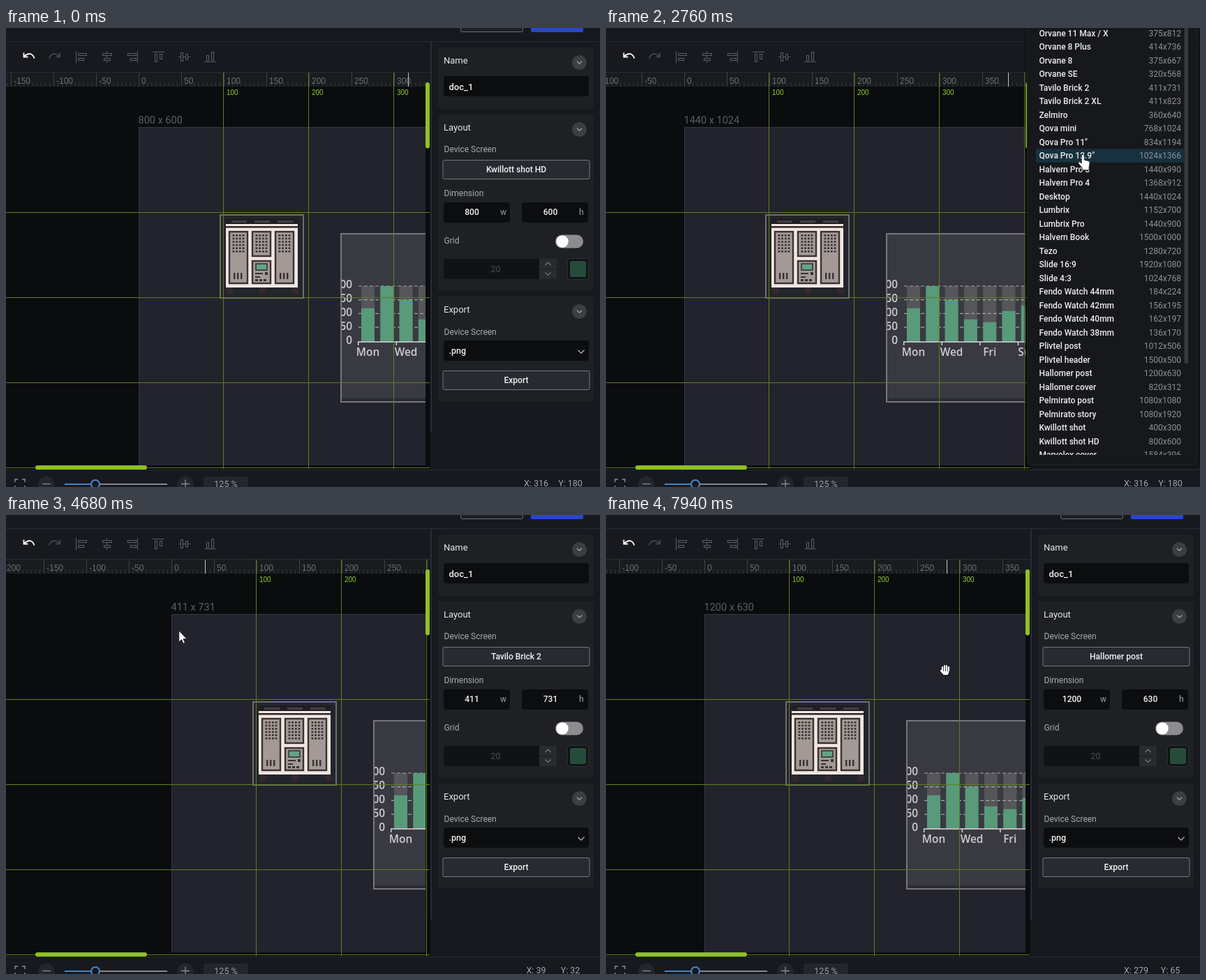
These frames come from a looping animation (851 by 658 pixels, 8000 ms). An HTML page:

```html
<!DOCTYPE html>
<html lang="en">
<head>
<meta charset="utf-8">
<title>Layout editor</title>
<style>
html, body { margin: 0; width: 100%; height: 100%; overflow: hidden; background: #17191f; }
svg { display: block; width: 851px; height: 658px; }
text { font-family: Roboto, "Liberation Sans", sans-serif; white-space: pre; }
.chart text { font: 600 15.4px "Open Sans", "Noto Sans", sans-serif; }
.ruler text { font-family: "Liberation Sans", Arial, sans-serif; }
</style>
</head>
<body>
<svg id="stage" viewBox="0 0 851 658" xmlns="http://www.w3.org/2000/svg"></svg>
<script>
const LOOP = 8000, UNIT = 1.22, FADE = 200, ROW = 19.5;
const MID = 'text-anchor="middle"', END = 'text-anchor="end"', MED = 'font-weight="500"';
const GUIDE = '#5c7f1f', LIME = '#8fc022', INPUT = '#0b0d0f';

// time, page left edge, width, height, preset name
const pages = [
  [0, 190, 800, 600, 'Kwillott shot HD'],
  [1690, 112, 1440, 1024, 'Desktop'],
  [3650, 237, 411, 731, 'Tavilo Brick 2'],
  [6230, 141, 1200, 630, 'Hallomer post']
];
const menuTimes = [[420, 1690], [2560, 3650], [5560, 6230]];
const clicks = [340, 1600, 2490, 3490, 5490, 6110];
// time, x, y
const path = [
  [70, 645, 300], [320, 705, 206], [520, 705, 206], [850, 700, 120], [1150, 691, 228.5],
  [1450, 688, 243], [1750, 687, 244], [2150, 687, 244], [2400, 690, 205], [2600, 690, 205],
  [3310, 658, 102], [3380, 656, 92], [3450, 655, 82], [3700, 655, 82], [4150, 590, 225],
  [4610, 286, 182], [4680, 248, 166], [4830, 219, 160], [5000, 265, 190], [5100, 380, 215],
  [5400, 695, 205], [5600, 695, 205], [6000, 652, 495], [6230, 652, 495], [6330, 462, 365],
  [6400, 377, 314], [6700, 215, 150], [7000, 118, 128], [7250, 190, 170], [7500, 455, 214],
  [7870, 488, 222], [8000, 488, 222]
];
const GRAB = 7300;

const presets = `Orvane 11 Max / X|375x812
Orvane 8 Plus|414x736
Orvane 8|375x667
Orvane SE|320x568
Tavilo Brick 2|411x731
Tavilo Brick 2 XL|411x823
Zelmiro|360x640
Qova mini|768x1024
Qova Pro 11"|834x1194
Qova Pro 12.9"|1024x1366
Halvern Pro 3|1440x990
Halvern Pro 4|1368x912
Desktop|1440x1024
Lumbrix|1152x700
Lumbrix Pro|1440x900
Halvern Book|1500x1000
Tezo|1280x720
Slide 16:9|1920x1080
Slide 4:3|1024x768
Fendo Watch 44mm|184x224
Fendo Watch 42mm|156x195
Fendo Watch 40mm|162x197
Fendo Watch 38mm|136x170
Plivtel post|1012x506
Plivtel header|1500x500
Hallomer post|1200x630
Hallomer cover|820x312
Pelmirato post|1080x1080
Pelmirato story|1080x1920
Kwillott shot|400x300
Kwillott shot HD|800x600
Marvolex cover|1584x396`.split('\n').map(s => s.split('|'));

const rect = (x, y, w, h, fill, more = '') =>
  `<rect x="${x}" y="${y}" width="${w}" height="${h}" fill="${fill}" ${more}/>`;
const stroke = (d, color, width = 1, more = '') =>
  `<path d="${d}" fill="none" stroke="${color}" stroke-width="${width}" ${more}/>`;
const circle = (x, y, r, fill, more = '') => `<circle cx="${x}" cy="${y}" r="${r}" fill="${fill}" ${more}/>`;
const text = (x, y, s, size, fill, more = '') =>
  `<text x="${x}" y="${y}" font-size="${size}" fill="${fill}" ${more}>${s}</text>`;
const group = (inner, more = '') => `<g ${more}>${inner}</g>`;
const clip = (id, x, y, w, h) => `<clipPath id="${id}">${rect(x, y, w, h, '#000')}</clipPath>`;
const each = (n, fn) => Array.from({ length: n }, (_, i) => fn(i)).join('');
const chevron = (x, y, s, color, up = 1) =>
  stroke(`M${x - s} ${y - s / 2 * up}L${x} ${y + s / 2 * up}L${x + s} ${y - s / 2 * up}`, color, 1.2);

function machine() {
  const dark = '#3a3231', pink = '#f2e6e2';
  const door = (x, y, h) => rect(x, y, 26, h, '#a39a97', `stroke="${dark}" stroke-width="2.4"`);
  const dots = x => each(24, i => rect(x + i % 4 * 4.7, 296 + (i >> 2) * 4.6, 2.8, 2.6, dark));
  const slits = x => each(3, i => rect(x + i * 5, 351, 2.4, 9, dark));
  return rect(117, 268, 119, 119, '#24242c', 'stroke="#6c6e72" stroke-width="2"') +
    each(3, i => rect(126 + i * 47, 372, 9, 9, '#33292c')) +
    rect(125, 273, 103, 8, '#1f1e22') + each(3, i => rect(133 + i * 33, 276, 22, 3, '#464143')) +
    rect(125, 281, 103, 91, pink) + rect(125, 284, 103, 2.5, '#2c2627') +
    door(130, 292, 74) + dots(134.5) + slits(136) +
    door(163, 292, 35) + dots(167.5) +
    door(196, 292, 74) + dots(200.5) + slits(202) +
    door(163, 334, 32) + rect(168, 338, 16, 9, '#64a387', `stroke="${dark}" stroke-width="1.6"`) +
    rect(167, 351, 11, 2, dark) + rect(167, 356, 7, 2, dark) + rect(181, 350, 4, 4, dark) +
    each(3, i => rect(167 + i * 6, 360, 4, 3, dark));
}

function chart() {
  const values = [120, 200, 150, 80, 70, 110, 130];
  const bar = (v, i, fill) => rect(319 + i * 27.3, 449.5 - v * .3975, 19, v * .3975, fill);
  const labels = ['Mon', 'Wed', 'Fri', 'Sun'];
  return rect(290, 295, 300, 241, '#393941') + rect(290, 531, 300, 4, '#2a2a32') +
    values.map((v, i) => bar(200, i, '#55555a')).join('') +
    each(4, i => stroke(`M315 ${370 + i * 19.7}H520`, '#a3a3a6', 1.2, 'stroke-dasharray="5 3"')) +
    values.map((v, i) => bar(v, i, '#589a7a')).join('') +
    stroke('M314 450H520', '#dcdcde', 1.4) +
    labels.map((s, i) => stroke(`M${314.7 + i * 54.6} 450v5`, '#dcdcde', 1.4) +
      text(328.5 + i * 54.6, 470, s, 15, '#cdcdcf', MID)).join('') +
    group(each(5, i => text(306, 453 - i * 20.1, i * 50, 15, '#cdcdcf', END)), 'clip-path="url(#plot)"') +
    rect(290, 295, 300, 241, 'none', 'stroke="#76787b" stroke-width="2"');
}

function ruler() {
  return each(170, i => stroke(`M${(i - 80) * 6.1 + .5} 78v6`, '#36383d')) +
    each(17, i => {
      const x = (i - 8) * 61;
      return stroke(`M${x + .5} 64v20`, '#3f4146') + text(x + 4, 80, (i - 8) * 50, 12, '#6b6d72');
    });
}

function toolbar() {
  const g = '#5c5f65';
  const box = (x, y, w, h) => rect(x + .5, y + .5, w, h, 'none', `stroke="${g}"`);
  const flip = (inner, x) => group(inner, `transform="translate(${x} 0)"`);
  const turn = (color, width) =>
    stroke('M25.5 35.5V41.5H31.5M26.5 40.5Q31 36.2 35 37.2Q39 38.4 40.5 43.5', color, width);
  return turn('#f2f2f2', 1.9) +
    group(turn('#4b4d53', 1.6), 'transform="translate(102.5 0) scale(-1 1)"') +
    flip(stroke('M.5 33v17', g) + box(3, 36, 12, 3) + box(3, 43, 8, 3), 100) +
    flip(stroke('M7.5 33v3M7.5 40v3M7.5 47v3', g) + box(1, 36, 13, 3) + box(3, 43, 9, 3), 137) +
    flip(stroke('M14.5 33v17', g) + box(0, 36, 12, 3) + box(4, 43, 8, 3), 174) +
    flip(stroke('M0 34.5h17', g) + box(3, 37, 3, 11) + box(10, 37, 3, 7), 210) +
    flip(stroke('M0 41.5h3M7 41.5h3M14 41.5h3', g) + box(3, 35, 3, 12) + box(10, 37, 3, 8), 247) +
    flip(stroke('M0 48.5h17', g) + box(3, 39, 3, 7) + box(10, 34, 3, 12), 284);
}

function panel() {
  const card = (y, h, title) => rect(619, y, 223, h, '#1e2024', 'rx="4"') +
    text(627, y + 23, title, 13, '#e6e7e9') + circle(821.5, y + 21.5, 10.5, '#3c3e44') +
    chevron(821.5, y + 21.5, 3.5, '#a6a8ac');
  const field = (x, y, w) => rect(x, y, w, 29, INPUT, 'rx="4"');
  const button = y => rect(626, y + .5, 210, 27, '#272a30', 'rx="2" stroke="#74777c"');
  const note = (y, s) => text(627.5, y, s, 12, '#a9abaf');
  return rect(608, 20, 243, 613, '#17191f') + stroke('M609 20V580', '#262c3a', 2) +
    card(28, 88, 'Name') + field(627, 69, 208) + text(634.5, 89, 'doc_1', 13, '#f0f0f1', MED) +
    card(124, 253, 'Layout') + note(178, 'Device Screen') + button(189) +
    text(731, 206.5, '', 12, '#f2f2f3', `${MID} ${MED} id="preset"`) +
    note(241, 'Dimension') + field(627, 250, 95) + field(739, 250, 95) +
    text(667.5, 268, '', 12, '#f2f2f3', `${MID} ${MED} id="w"`) + text(708, 268, 'w', 12, '#9fa1a5') +
    text(780, 268, '', 12, '#f2f2f3', `${MID} ${MED} id="h"`) + text(821, 268, 'h', 12, '#9fa1a5') +
    note(309, 'Grid') + rect(787, 296.5, 40, 19, '#8d8d8f', 'rx="9.5"') + circle(797, 306, 8.7, '#fff') +
    rect(627, 331, 138, 29, '#101215', 'rx="4"') + text(701.5, 350, '20', 12.5, '#4b4d52', MID) +
    rect(764, 331, 25, 14, '#292b2f') + rect(764, 346, 25, 14, '#292b2f') +
    chevron(776.5, 338, 4, '#76787c', -1) + chevron(776.5, 352.5, 4, '#76787c') +
    rect(804.5, 330.5, 30, 30, '#111316', 'rx="4" stroke="#2d3035"') + rect(808, 334, 23, 23, '#264b3a', 'rx="3"') +
    card(385, 150, 'Export') + note(440, 'Device Screen') + field(627, 448, 208) +
    text(634.5, 467, '.png', 12.5, '#f0f0f1', MED) + chevron(824, 464, 4.5, '#b9bbbe') +
    button(491) + text(731, 508.5, 'Export', 12, '#f2f2f3', `${MID} ${MED}`);
}

function footer() {
  const g = '#8b8d92';
  return rect(0, 633, 851, 25, '#17191f') + rect(0, 633, 851, 1, '#2b2e35') +
    stroke('M13 651v-4h4M23 647h4v4M13 656v4M27 656v4', g, 1.4) +
    circle(58, 654, 11.5, '#23262c') + stroke('M52 653.5h12', g, 1.3) +
    rect(84, 653, 147, 2, '#85878b') + rect(84, 653, 44, 2, '#4682c4') +
    circle(128, 654, 6, '#17191f', 'stroke="#4c8ad0" stroke-width="2"') +
    circle(257, 654, 11.5, '#23262c') + stroke('M251 653.5h12M257 647.5v12', g, 1.3) +
    rect(283, 643, 64, 22, '#23262c', 'rx="3"') + text(315, 658, '125 %', 12.5, '#9b9da2', MID) +
    text(759.5, 657, '', 12.5, '#a3a5a9', `${MID} id="px"`) + text(808.5, 657, '', 12.5, '#a3a5a9', `${MID} id="py"`);
}

function menu() {
  const rows = presets.map(([name, size], i) => {
    const y = 11.5 + i * ROW;
    return text(620.5, y, name, 12, '#ececee', MED) + text(824, y, size, 12, '#8f9196', END);
  }).join('');
  return rect(599, -20, 252, 650, '#000', 'rx="6" opacity=".22"') +
    rect(603.5, -20, 243, 646.5, '#16181c', 'rx="5" stroke="#202226"') +
    group(rect(616, 0, 212, ROW, '#17313e', 'id="hover"') + rows, 'clip-path="url(#list)"') +
    rect(828.5, -10, 5.5, 491, '#37393c', 'rx="2.7"');
}

function pointers() {
  const edge = 'fill="#fff" stroke="#16171a" stroke-width=".8" stroke-linejoin="round"';
  const fingers = 'M-4 2V-4M-1 1V-6M2 1V-6M5 1V-4M-4 4L-6 1';
  const palm = 'M-5 1H6V4L4 8H-3L-5 4Z';
  return circle(0, 0, 11.5, '#c9bd16', 'opacity=".78" id="ring"') +
    `<path id="arrow" d="M0 0V16L3.7 12.6L6.2 18.3L8.6 17.2L6.2 11.7H11.2Z" ${edge}/>` +
    `<path id="finger" d="M-1.5 1.5a2 2 0 0 1 4 0V7.5l5.5 1.3q2.5 .6 2.3 3l-1 6v4.2H-.5v-3l-5-6q-1.2-2.3 .7-3l3.3 2.2Z" ${edge}/>` +
    group(stroke(fingers, '#16171a', 3.8, 'stroke-linecap="round"') +
      `<path d="${palm}" fill="#fff" stroke="#16171a" stroke-width="1.4"/>` +
      stroke(fingers, '#fff', 2.2, 'stroke-linecap="round"'), 'id="grab" transform="translate(-2 0)"');
}

document.getElementById('stage').innerHTML =
  `<defs>${clip('view', 0, 84, 601, 543)}${clip('scale', 0, 64, 607, 20)}${clip('guides', 0, 64, 607, 568)}
  ${clip('list', 603, 0, 240, 612)}${clip('plot', 291, 296, 200, 200)}</defs>` +
  rect(0, 0, 851, 658, '#17191f') + rect(0, 19, 851, 1, '#2a2c32') +
  rect(651.5, -20, 89, 25.5, '#1c1f24', 'rx="2" stroke="#6d7074"') + rect(752, -20, 75, 26, '#2b46c8', 'rx="2"') +
  toolbar() + rect(0, 63, 608, 571, '#0a0c0e') + rect(0, 63, 608, 21, '#191b1f') + rect(0, 63, 608, 1, '#2a2c31') +
  group(group(rect(.5, 142.5, 1800, 700, '#23232d', 'stroke="#37373f"') +
    text(-.5, 136.5, '', 14.5, '#5c5e65', 'id="size"') + machine() + group(chart(), 'class="chart"'),
    'class="page"'), 'clip-path="url(#view)"') +
  group(group(ruler(), 'class="page ruler"') + rect(0, 64, 1, 20, '#c4c5c7', 'id="mark"'), 'clip-path="url(#scale)"') +
  each(4, i => stroke(`M0 ${264.5 + i * 122}H607`, GUIDE)) +
  group(group(each(4, i => stroke(`M${121.5 + i * 122} 64V632`, GUIDE)), 'class="page"'), 'clip-path="url(#guides)"') +
  group(group(each(4, i => text(126 + i * 122, 95.5, (i + 1) * 100, 10, '#93cc2a')), 'class="page ruler"'), 'clip-path="url(#view)"') +
  rect(601, 78, 6, 94.5, LIME, 'rx="3" clip-path="url(#guides)"') + rect(42, 627, 160, 6, LIME, 'rx="3"') +
  panel() + footer() + group(menu(), 'id="menu"') + group(pointers(), 'id="cursor"');

const el = {};
document.querySelectorAll('svg [id]').forEach(n => el[n.id] = n);
const movers = document.querySelectorAll('.page');
const show = (node, on) => node.setAttribute('visibility', on ? 'visible' : 'hidden');
const clamp = v => Math.max(0, Math.min(1, v));

function at(t) {
  const i = path.findIndex(k => k[0] > t);
  if (i <= 0) return path[i < 0 ? path.length - 1 : 0].slice(1);
  const a = path[i - 1], b = path[i], f = (t - a[0]) / (b[0] - a[0]);
  return [a[1] + (b[1] - a[1]) * f, a[2] + (b[2] - a[2]) * f];
}

// The ruler mark trails the pointer and holds while it is outside the canvas.
function probe(t, left, grab) {
  const [x, y] = at(t - 70);
  if (x < 600) return [x, Math.round((x - left - 1 - (grab ? 6 : 0)) / UNIT), Math.round((y - 143) / UNIT)];
  return t < 5000 ? [576, 316, 180] : [595, 293, 52];
}

function draw(t) {
  const [, left, w, h, name] = pages.filter(p => p[0] <= t).pop();
  movers.forEach(n => n.setAttribute('transform', `translate(${left} 0)`));
  el.size.textContent = `${w} x ${h}`;
  el.preset.textContent = name;
  el.w.textContent = w;
  el.h.textContent = h;

  const grab = t >= GRAB;
  const [mark, px, py] = probe(t, left, grab);
  el.mark.setAttribute('x', Math.round(mark));
  el.px.textContent = `X: ${px}`;
  el.py.textContent = `Y: ${py}`;

  const [x, y] = at(t);
  const open = menuTimes.some(([a, b]) => t >= a && t < b);
  const alpha = Math.max(...menuTimes.map(([a, b]) => Math.min(clamp((t - a) / FADE), clamp((b + FADE - t) / FADE))));
  el.menu.setAttribute('opacity', alpha);
  show(el.menu, alpha > 0);
  const row = Math.floor((y + 2.25) / ROW);
  el.hover.setAttribute('y', row * ROW - 2.25);
  el.hover.setAttribute('opacity', open && x > 616 && x < 828 ? 1 : 0);

  const finger = x > 616 && x < 836 && (open || (y > 189 && y < 217));
  el.cursor.setAttribute('transform', `translate(${x} ${y})`);
  show(el.arrow, t >= 70 && !finger && !grab);
  show(el.finger, t >= 70 && finger);
  show(el.grab, grab);
  show(el.ring, clicks.some(c => t >= c && t < c + 140));
}

function tick() {
  draw(performance.now() % LOOP);
  requestAnimationFrame(tick);
}
tick();
</script>
</body>
</html>
```
